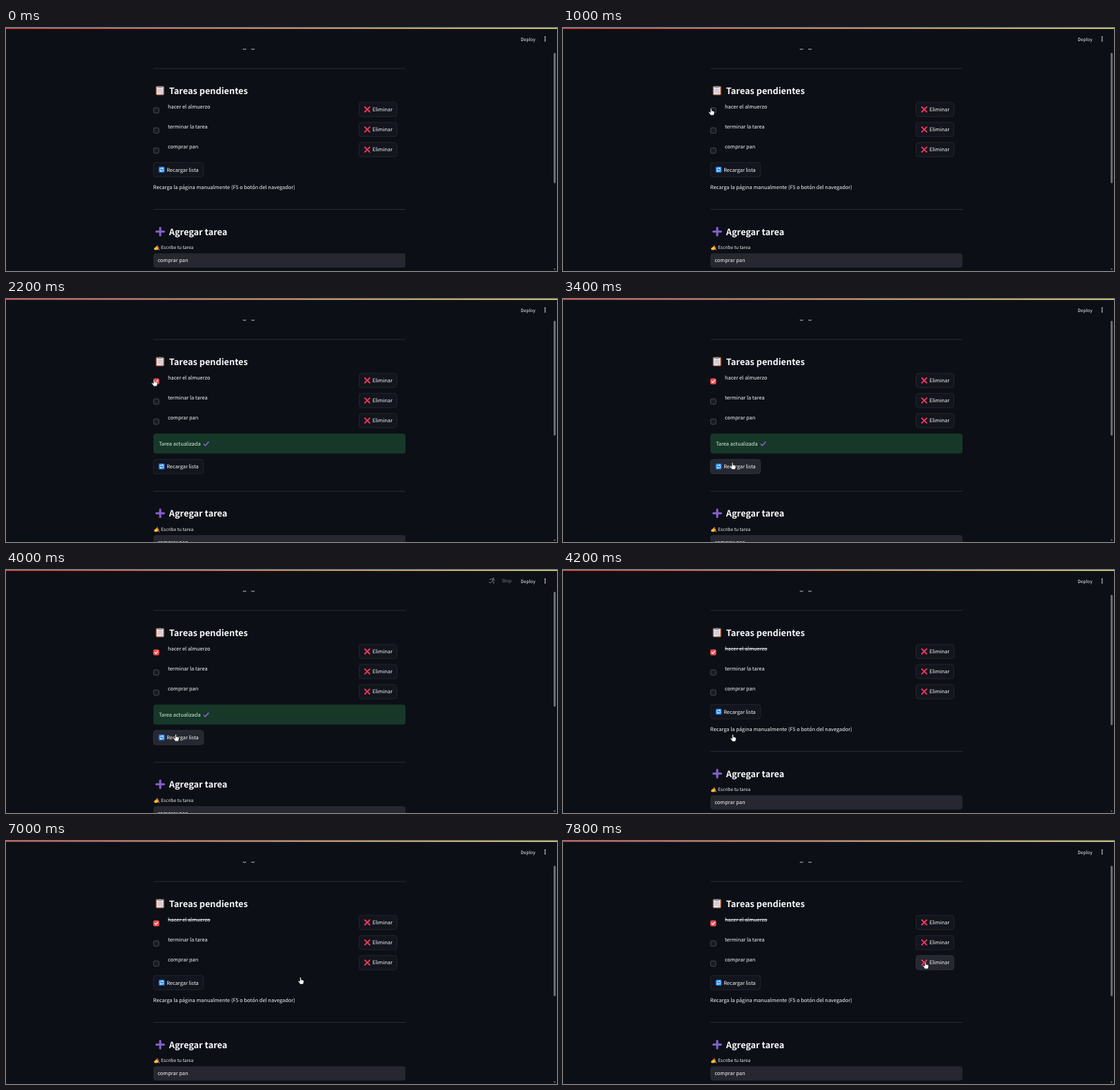
These frames come from a looping animation (800 px wide and 353 px high, 8 s). An HTML page:

```html
<!DOCTYPE html>
<html lang="es">
<head>
<meta charset="utf-8">
<title>Tareas</title>
<style>
html, body { margin: 0; width: 100%; height: 100%; overflow: hidden; background: #0c0f16; }
svg { display: block; width: 100vw; height: 100vh; }
text {
  font: 400 7.45px "Noto Sans CJK JP", "Noto Sans CJK SC", "Noto Sans CJK", "Open Sans", sans-serif;
  fill: #fafafa; text-rendering: geometricPrecision; white-space: pre;
}
.small { font-size: 6.52px; }
.head { font-size: 12.75px; font-weight: 700; }
.btn { fill: #12151d; stroke: #2b2e37; stroke-width: .7; }
.btn.hover { fill: #262831; stroke: #3a3c45; }
.box { fill: #191b23; stroke: #55575f; stroke-width: .8; }
.rule { fill: #31343b; }
.line { fill: none; stroke-linecap: round; stroke-linejoin: round; }
.done { text-decoration: line-through; }
</style>
</head>
<body>
<svg viewBox="0 0 800 353" preserveAspectRatio="none">
  <defs>
    <linearGradient id="bar"><stop offset="0" stop-color="#ff4b4b"/><stop offset="1" stop-color="#fffd80"/></linearGradient>
    <g id="cross"><path class="line" d="M1.3 1.3L8.3 8.3M8.3 1.3L1.3 8.3" stroke="#f3355f" stroke-width="2"/></g>
    <g id="reload">
      <rect width="8.6" height="8.6" rx="1.5" fill="#2386ea"/>
      <path class="line" d="M2 4.2V3.2Q2 2.4 2.8 2.4H5.8M6.6 4.4V5.4Q6.6 6.2 5.8 6.2H2.8" stroke="#fff" stroke-width=".9"/>
      <path d="M5.2 1L7.2 2.4L5.2 3.8ZM3.4 4.8L1.4 6.2L3.4 7.6Z" fill="#fff"/>
    </g>
    <g id="clipboard">
      <rect x=".6" y="1" width="12" height="13" rx="1.4" fill="#c9764c"/>
      <rect x="2" y="2.6" width="9.2" height="10.2" rx=".5" fill="#eceaf2"/>
      <path d="M8.2 12.8V9.8H11.2Z" fill="#b8b5c8"/>
      <path class="line" d="M3.6 6H9.6M3.6 8H9.6M3.6 10H7" stroke="#9b98ad" stroke-width=".7"/>
      <path d="M3.8 1.6H5.2A1.5 1.5 0 0 1 8 1.6H9.4V3.8H3.8Z" fill="#8f9bb0"/>
    </g>
    <g id="write">
      <path d="M.6 5.2L3.4 3.2L5.6 3.7L7 5.4L5.6 7.6L2.4 8L.5 7.4Z" fill="#fbc13c"/>
      <path class="line" d="M3 4L5.4 2.4M4.8 5.4L6.9 4.4" stroke="#f4a92f" stroke-width="1.3"/>
      <path class="line" d="M4.6 1L7.4 7" stroke="#d9573e" stroke-width="1"/>
      <path class="line" d="M7.4 7L7.8 7.9" stroke="#e8dcd0" stroke-width=".7"/>
    </g>
    <path id="hand" d="M-.9 .9Q0 -.5 .9 .9V4L2 3.9L3.1 4.3L4.2 4.7Q4.9 5 4.8 5.8L4.5 8.2L3.7 10.2H-.8L-1.6 8.4L-3.5 6.2Q-3.6 5 -2.5 5.2L-.9 6.3Z"
      fill="#fff" stroke="#15171d" stroke-width=".6" stroke-linejoin="round"/>
  </defs>

  <rect width="800" height="353" fill="#0c0f16"/>
  <path class="line" d="M344.2 30.7q2.1 1.1 4.2 0M356.4 30.7q2.1 1.1 4.2 0" stroke="#c9cacc" stroke-width="1"/>
  <rect width="800" height="1.2" fill="url(#bar)"/>
  <g id="status" opacity=".5">
    <circle cx="707.5" cy="12.4" r="1.1" fill="#fafafa"/>
    <path class="line" d="M702.2 14L704.8 13L707 14.3L705.6 16.5L708.3 17.6L708 20.2M707 14.3L709.8 15M705.3 17L703.8 18.4L701.5 18" stroke="#fafafa" stroke-width=".9"/>
    <text class="small" x="720" y="18.3">Stop</text>
  </g>
  <text class="small" x="747.3" y="18.5">Deploy</text>
  <g fill="#fafafa"><circle cx="782.7" cy="13.2" r=".9"/><circle cx="782.7" cy="15.9" r=".9"/><circle cx="782.7" cy="18.6" r=".9"/></g>
  <rect id="thumb" x="795" width="3.2" rx="1.6" fill="#6a6b6f"/>
  <path d="M794.8 349.6H798.2L796.5 351.8Z" fill="#77787c"/>

  <rect class="rule" x="214" y="58.5" width="366" height=".8"/>
  <use href="#clipboard" x="217" y="83.5"/>
  <text class="head" x="236.8" y="95.8">Tareas pendientes</text>
  <g id="rows"></g>

  <g id="success">
    <rect x="214" y="195.4" width="366" height="29.2" rx="4" fill="#173828"/>
    <text x="222" y="212.8" style="fill:#dcf3e4">Tarea actualizada</text>
    <path class="line" d="M287.3 211L289.4 213L294 207.8" stroke="#8465d2" stroke-width="1.7"/>
  </g>
  <g id="refresh">
    <rect class="btn" id="reloadBtn" x="214" y="195.4" width="72.8" height="20.8" rx="4"/>
    <use href="#reload" x="221.7" y="201.4"/>
    <text x="233.2" y="208.6">Recargar lista</text>
  </g>
  <text id="hint" x="213.8" y="233.8">Recarga la página manualmente (F5 o botón del navegador)</text>

  <g id="form">
    <rect class="rule" x="214" y="263.2" width="366" height=".8"/>
    <path class="line" d="M218.4 295.7H229.4M223.9 290.2V301.2" stroke="#8560cb" stroke-width="3.1"/>
    <text class="head" x="236.8" y="300.6">Agregar tarea</text>
    <use href="#write" x="214.6" y="314.6"/>
    <text class="small" x="225" y="321.4">Escribe tu tarea</text>
    <rect x="214" y="327.3" width="366" height="20.8" rx="4" fill="#262730"/>
    <text x="220.2" y="340.4">comprar pan</text>
  </g>
  <use id="cursor" href="#hand"/>
</svg>
<script>
const LOOP = 8000, TICK = 200;
const $ = id => document.getElementById(id);
const tasks = ["hacer el almuerzo", "terminar la tarea", "comprar pan"];

$("rows").innerHTML = tasks.map((name, i) => `
  <g transform="translate(0 ${i * 29.2})">
    <rect class="box" x="214.3" y="115.8" width="7.8" height="7.8" rx="1.8"/>
    ${i ? "" : `<g id="tick"><rect x="213.9" y="115.4" width="8.4" height="8.4" rx="1.8" fill="#ff4b4b"/>
      <path class="line" d="M215.9 119.7L217.5 121.3L220.5 117.9" stroke="#fff" stroke-width="1.2"/></g>`}
    <text id="task${i}" x="235" y="117">${name}</text>
    <rect class="btn" id="del${i}" x="512.5" y="107.9" width="55" height="20.8" rx="4"/>
    <use href="#cross" x="519.7" y="113.4"/>
    <text x="532" y="121.1">Eliminar</text>
  </g>`).join("");

// start, end, from x, y, to x, y
const moves = [
  [400, 1000, 259, 136, 215, 116.5],
  [2200, 3200, 215, 116.5, 246, 237.3],
  [3400, 4200, 246, 237.3, 246.5, 238.8],
  [6400, 7400, 246.5, 238.8, 526, 175.5]
];
const ease = p => p * p * (3 - 2 * p);

function pointer(t) {
  const [a, b, x0, y0, x1, y1] = moves.filter(m => t >= m[0]).pop() || moves[0];
  const p = ease(Math.min(1, Math.max(0, (t - a) / (b - a))));
  return [x0 + (x1 - x0) * p, y0 + (y1 - y0) * p];
}

const within = (t, a, b) => t >= a && t < b;
const show = (id, on) => $(id).style.display = on ? "" : "none";
const shift = (id, y) => $(id).setAttribute("transform", `translate(0 ${y})`);

function hover(id, x, y, on) {
  const box = $(id).getBBox(), m = $(id).getCTM(), s = $(id).ownerSVGElement.getCTM();
  const dy = (m.f - (s ? s.f : 0)) / m.d;
  const inside = within(x, box.x, box.x + box.width) && within(y - dy, box.y, box.y + box.height);
  $(id).classList.toggle("hover", on && inside);
}

function draw(time) {
  const t = Math.floor(time % LOOP / TICK) * TICK;
  const saved = within(t, 2200, 4200);
  const [x, y] = pointer(t);
  const visible = within(t, 400, 6000) || t >= 6400;

  show("status", within(t, 2000, 2200) || within(t, 3800, 4200));
  show("tick", t >= 2000);
  show("success", saved);
  show("hint", !saved);
  shift("refresh", saved ? 37.6 : 0);
  shift("form", saved ? 15.6 : 0);
  $("task0").classList.toggle("done", t >= 4200);
  $("thumb").setAttribute("y", saved ? 31.5 : 36);
  $("thumb").setAttribute("height", saved ? 167 : 189.5);

  show("cursor", visible);
  $("cursor").setAttribute("transform", `translate(${x} ${y})`);
  ["reloadBtn", "del0", "del1", "del2"].forEach(id => hover(id, x, y, visible));
}

const start = performance.now();
function frame(now) {
  draw(Math.max(0, now - start));
  requestAnimationFrame(frame);
}
draw(0);
requestAnimationFrame(frame);
</script>
</body>
</html>
```
